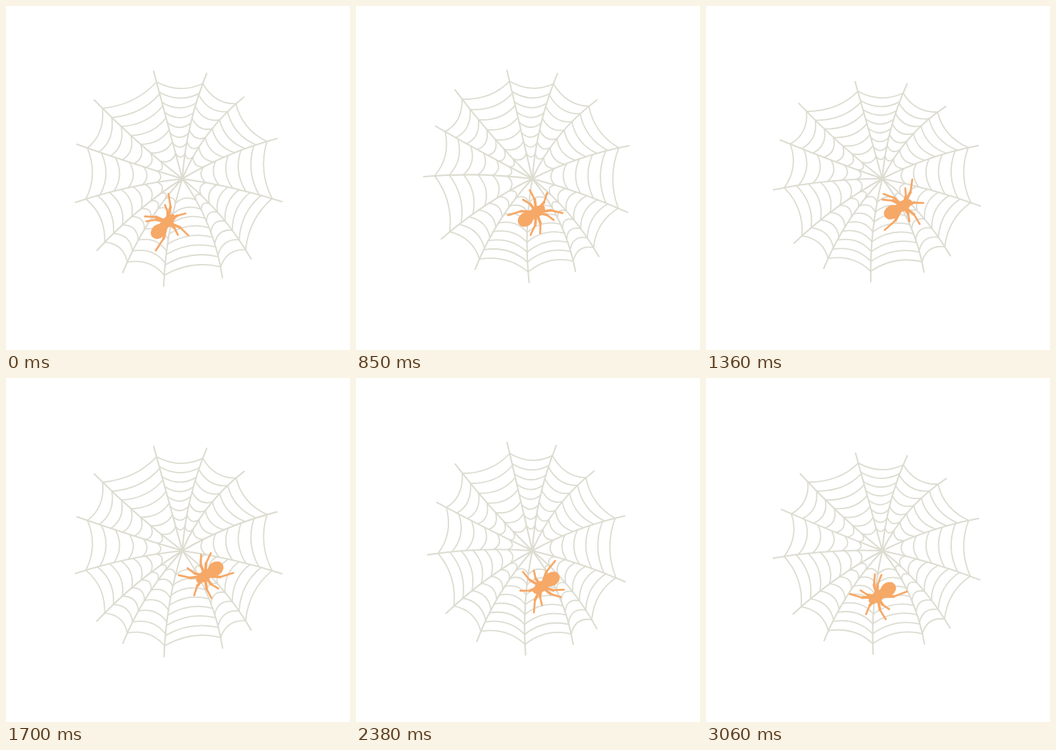
These frames come from a looping animation (480x480 px, 3.23 s). An HTML page with a canvas:

```html
<!DOCTYPE html>
<html lang="en">
<head>
<meta charset="utf-8">
<title>Spider on a web</title>
<style>
html, body { margin: 0; width: 100%; height: 100%; overflow: hidden; background: #fff; }
canvas { display: block; width: 480px; height: 480px; }
</style>
</head>
<body>
<canvas id="stage" width="480" height="480"></canvas>
<script>
const g = document.getElementById('stage').getContext('2d');
const STEP = 170, COUNT = 19, TURN_STEP = 10, HUB = [246, 241];
const WEB = '#dddcd1', ORANGE = '#f6a867';
const TAU = 2 * Math.PI, RAD = TAU / 360;

// Each spoke: tip at rest (x, y from the hub), sway in degrees, bend in pixels
const spokes = [
  [-40, -150, 1.7, 0], [34, -147, .5, -6], [86, -114, 2.6, -9], [132, -56, 4.3, -5],
  [139, 32, 7.3, -3], [96, 112, 1.3, -7], [56, 138, -2, -9], [-26, 150, -8.2, 5],
  [-83, 131, -1.2, 7], [-119, 100, 5.4, 5], [-149, 33, 13.7, 4], [-147, -48, 10.3, -1],
  [-123, -110, 7, -3]
];

const polar = (r, a) => [r * Math.cos(a), r * Math.sin(a)];
const mix = (a, b, k) => a.map((v, i) => v + (b[i] - v) * k);

function curve(a, c, b) {
  g.beginPath();
  g.moveTo(...a);
  g.quadraticCurveTo(...c, ...b);
  g.stroke();
}

function line(width, ...points) {
  g.lineWidth = width;
  g.beginPath();
  points.forEach(p => g.lineTo(...p));
  g.stroke();
}

function blob(x, y, rx, ry) {
  g.beginPath();
  g.ellipse(x, y, rx, ry, 0, 0, TAU);
  g.fill();
}

// Turns the threads, narrows the web in one half of the sway, lowers its top in the other
function webTips(step) {
  const phase = TAU * step / 10.5;
  const sway = (1 - Math.cos(phase)) / 2, pinch = Math.sin(phase);
  const narrow = 1 - .05 * Math.max(0, pinch);
  const lower = 1 - .1 * Math.max(0, -pinch);
  const lift = 1 - .05 * Math.max(Math.abs(pinch), sway);
  return spokes.map(([x, y, turn]) => {
    const [tx, ty] = polar(Math.hypot(x, y), Math.atan2(y, x) + turn * sway * RAD);
    return [tx * narrow, ty * (ty > 0 ? lift : lower)];
  });
}

function drawWeb(step) {
  const threads = webTips(step).map(([x, y], i) => {
    const bend = spokes[i][3] / Math.hypot(x, y);
    return f => {
      const push = 4 * f * (1 - f) * bend;
      return [x * f - y * push, y * f + x * push];
    };
  });

  g.save();
  g.translate(...HUB);
  g.strokeStyle = g.fillStyle = WEB;
  threads.forEach((at, i) => {
    g.lineWidth = 2.1;
    const tip = at(1);
    curve([0, 0], at(.5).map((v, n) => 2 * v - tip[n] / 2), tip);

    g.lineWidth = 1.8;
    const next = threads[(i + 1) % threads.length];
    const [mx, my] = mix(tip, next(1), .5);
    const rings = 6 + Math.round(1.6 * Math.abs(my) / Math.hypot(mx, my));
    for (let n = 0; n < rings; n++) {
      const r = 1 - .74 * n / (rings - 1);
      const a = at(.9 * r), b = next(.9 * r), mid = mix(a, b, .5);
      curve(a, mix(mid, [0, 0], 8 * (1 + r) / Math.hypot(...mid)), b);
    }
  });
  blob(0, 0, 3.2, 3.2);
  g.restore();
}

// Climbs with growing speed, then walks back facing the other way
function spiderPlace(n) {
  if (n < TURN_STEP) return [226 + 3.6 * n + .33 * n * n, 301 - 2.8 * n, 2 * n - 45];
  const m = n - TURN_STEP;
  return [277 - 4.8 * m, 277 + 3.6 * m, 145];
}

function drawSpider(step) {
  const [x, y, heading] = spiderPlace(step);
  const gait = Math.cos(TAU * step / 7.5);

  g.save();
  g.translate(x, y);
  g.rotate(heading * RAD);
  g.strokeStyle = g.fillStyle = ORANGE;
  for (const side of [-1, 1]) {
    [[32, 33], [67, 29], [110, 28], [146, 37]].forEach(([angle, reach], leg) => {
      const swing = gait * side * (leg % 2 ? 1 : -1);
      const a = side * RAD * (angle + 12 * swing), r = reach * (1 + .18 * swing);
      const knee = polar(r * .55, a - side * .15), foot = polar(r, a);
      line(3.8, polar(4, a), knee);
      line(2.7, knee, foot);
    });
  }
  blob(-19, 0, 11.5, 9.5);
  blob(-9, 0, 7, 6.5);
  blob(0, 0, 9, 7.5);
  blob(8, 0, 5, 5);
  g.restore();
}

function draw(now) {
  const step = Math.floor(now / STEP) % COUNT;
  g.clearRect(0, 0, 480, 480);
  g.lineCap = g.lineJoin = 'round';
  drawWeb(step);
  drawSpider(step);
}

const start = performance.now();
function tick() {
  draw(performance.now() - start);
  requestAnimationFrame(tick);
}
tick();
</script>
</body>
</html>
```
